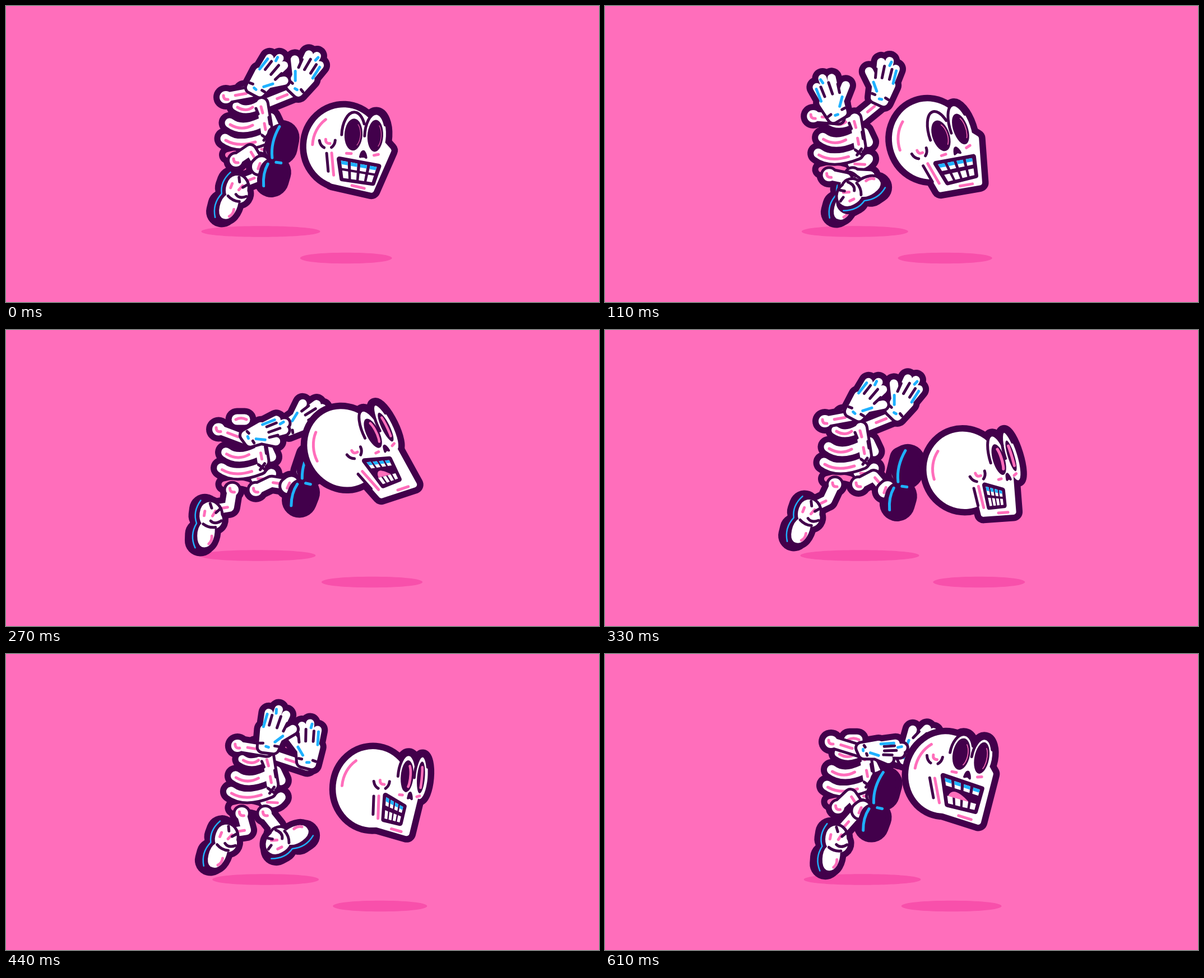
Recreate the animation shown at these times as an HTML page with a canvas. Size 1058 px wide and 529 px high, loop 0.66 s.

```html
<!DOCTYPE html>
<html lang="en">
<head>
<meta charset="utf-8">
<title>Skull dribble</title>
<style>
  html, body { margin: 0; width: 100%; height: 100%; overflow: hidden; background: #ff6ebb; }
  canvas { display: block; width: 100vw; height: 100vh; }
</style>
</head>
<body>
<canvas id="stage" width="1058" height="529"></canvas>
<script>
const ctx = document.getElementById('stage').getContext('2d');
const PINK = '#ff6ebb', SHADE = '#f850ab', DARK = '#42004b', BLUE = '#1fb1ff', WHITE = '#fff';
const HALO = 22, LINE = 10;
const LOOP = 660, BOUNCE = LOOP / 2, CONTACT = 50;
const TICKS = [0, 50, 110, 160, 220, 270, 330, 380, 440, 500, 550, 610];

// Evenly spaced points of one stride: x, y, turn. Both feet follow them, half a loop apart.
const STRIDE = [[479, 282, -176], [430, 374, -80], [359, 346, 2], [352, 335, 24], [410, 347, 8], [488, 272, -167]];

const HAND = {
  solid: 'M-9,-4L-17,-36L13,-38L10,-8Z M-14,-40L-19,-67 M-4,-40L-4,-79 M8,-40L12,-74 M10,-27L32,-53',
  marks: [
    ['M-11,-46L-12,-65M4,-46L4,-68M17,-44L19,-60M-17,-9L-11,-11M11,-13L17,-14', DARK, 5],
    ['M-20,-40L-21,-64M9,-20L19,-35M-4,-7L1,-7M-6,-71L-8,-78', BLUE, 5]]
};
const SHOE = {
  sole: 'M-11,31L-11,19M-6,-14L-5,-25',
  edge: [['M-20,44Q-31,22 -19,0Q-27,-20 -13,-41', BLUE, 2.5]],
  upper: 'M-3,-36C-16,-30 -15,-8 -9,0C-19,10 -18,36 -8,41C8,45 14,24 13,8C25,6 29,-8 23,-16C22,-32 8,-41 -3,-36Z',
  marks: [
    ['M-5,-22L-6,-14M9,-14L14,-23M9,22Q10,31 4,36', PINK, 5],
    ['M-7,1Q3,8 15,6M4,-36L7,-28M21,-26L15,-20M25,-6Q14,2 6,-5', DARK, 5]]
};
const TREAD = {
  side: 'M10,48L13,17',
  cuff: 'M26,-9L30,-14',
  lobes: 'M-3,43L-2,25M3,-20L5,-34',
  marks: [['M4,62Q16,32 9,5M1,-2L-8,-2M15,-7Q22,-25 17,-47', BLUE, 5]]
};

const lerp = (a, b, t) => a + (b - a) * t;
const mod = (a, n) => ((a % n) + n) % n;
const clamp = (v, low, high) => Math.min(high, Math.max(low, v));
// Cosine that peaks at the given time, n times per loop.
const wave = (t, peak, n = 1) => Math.cos((t - peak) / LOOP * n * 2 * Math.PI);
const place = (x, y, turn = 0, sx = 1, sy = 1) => new DOMMatrix().translate(x, y).rotate(turn).scale(sx, sy);
const segment = (x1, y1, x2, y2, from = 0, to = 1) =>
  `M${lerp(x1, x2, from)},${lerp(y1, y2, from)}L${lerp(x1, x2, to)},${lerp(y1, y2, to)}`;

function shape(d, matrix = new DOMMatrix()) {
  const path = new Path2D();
  path.addPath(new Path2D(d), matrix);
  return path;
}

function oval(x, y, rx, ry, from = 0, to = 360) {
  const rad = Math.PI / 180, path = new Path2D();
  path.ellipse(x, y, rx, ry, 0, from * rad, to * rad);
  return path;
}

function stroke(path, color, width) {
  ctx.strokeStyle = color;
  ctx.lineWidth = width;
  ctx.stroke(path);
}

function solid(path, color, width = 0) {
  ctx.fillStyle = color;
  ctx.fill(path);
  if (width) stroke(path, color, width);
}

const line = (d, color, width) => stroke(new Path2D(d), color, width);

// A part merges several [path, width] solids inside one outline.
function part(solids, marks = [], matrix, color = WHITE) {
  return {
    color,
    solids: solids.map(([d, w]) => [shape(d, matrix), w]),
    marks: marks.map(([d, c, w]) => [shape(d, matrix), c, w])
  };
}

function paint(parts) {
  const fill = (p, color, extra) => p.solids.forEach(([path, w]) => solid(path, color, w + extra));
  parts.forEach(p => fill(p, DARK, HALO));
  parts.forEach(p => {
    fill(p, DARK, LINE);
    fill(p, p.color, 0);
    p.marks.forEach(mark => stroke(...mark));
  });
}

const knob = (x, y) => [`M${x},${y}l.5,0`, 22];
const knobMark = (x, y) => [`M${x - 4},${y - 3}q0,8 8,7`, PINK, 5];

function hand({ x, y, turn, side }) {
  const width = side * (1 - .5 * (turn / 90) ** 2);
  return part([[HAND.solid, 15]], HAND.marks, place(x, y, turn, width, .97));
}

function foot(matrix, fromBelow) {
  if (fromBelow) return [
    part([[TREAD.side, 18]], [], matrix),
    part([[TREAD.cuff, 25]], [['M31,-18L29,-8', PINK, 5]], matrix),
    part([[TREAD.lobes, 41]], TREAD.marks, matrix, DARK)];
  return [
    part([[SHOE.sole, 34]], SHOE.edge, matrix, DARK),
    part([[SHOE.upper, 2]], SHOE.marks, matrix)];
}

// The knee bends forward as far as two equal bones require.
function leg(hipX, hipY, t, shift) {
  const step = mod(t - CONTACT, LOOP) / LOOP * STRIDE.length, i = Math.floor(step);
  const next = STRIDE[(i + 1) % STRIDE.length];
  const [x, y, turn] = STRIDE[i].map((v, n) => lerp(v, next[n], step - i));
  const matrix = place(x + shift, y, turn), below = turn < -150;
  const end = matrix.transformPoint(below ? { x: 30, y: -12 } : { x: 8, y: -25 });
  const dx = end.x - hipX, dy = end.y - hipY, reach = Math.hypot(dx, dy), bone = 31;
  const bend = Math.sqrt(Math.max(0, bone ** 2 - (reach / 2) ** 2)) / reach;
  const kneeX = hipX + dx / 2 + dy * bend, kneeY = hipY + dy / 2 - dx * bend;
  const shin = [kneeX, kneeY, end.x, end.y];
  return [
    part([[segment(hipX, hipY, kneeX, kneeY) + segment(...shin), 17], knob(hipX, hipY)],
      [knobMark(hipX, hipY), [segment(...shin, .1, .6), PINK, 5]]),
    ...foot(matrix, below)];
}

function torso(x, y) {
  const at = place(x, y);
  return [
    part([['M-4,57Q20,50 44,60', 10]], [], at, PINK),
    part([['M52,46Q70,52 80,38M72,-9L80,8', 17]], [['M56,47L74,48', PINK, 5]], at),
    part([['M11,-30Q28,-18 52,-32', 14], ['M-1,0Q20,16 54,0M-9,28Q15,46 60,28', 17], ['M56,-34L64,16', 18]], [
      ['M13,-28Q28,-19 40,-28M0,3Q20,15 40,4M-8,31Q14,44 45,34M55,-29L58,-18M61,1L63,12', PINK, 5],
      ['M46,-26L50,-16M69,-10L71,2M57,22L68,30M68,20L60,31', DARK, 5]], at)];
}

function arm(x, y, { x: hx, y: hy }, socket) {
  const bone = [x, y, hx, hy], marks = [[segment(...bone, .35, .75), PINK, 5]];
  return socket
    ? part([[segment(...bone), 16], knob(x, y)], [...marks, knobMark(x, y)])
    : part([[segment(...bone), 16]], marks);
}

function body(t, sway, landing) {
  const x = 400 - 12 * sway, y = 209 + 10 * sway + 27 * landing;
  const shoulderX = x - 8 - 12 * sway, shoulderY = y - 46 + 9 * sway;
  const drop = 150 + 35 * (1 + wave(t, 190, 2));
  const push = -wave(t, CONTACT + BOUNCE * .1, 2);
  const near = { x: 441 - 28 * sway, y: drop + 16 * sway, turn: 40 + 46 * push - 22 * sway, side: 1 };
  const far = { x: 513 - 28 * sway, y: drop - 16 * sway, turn: 30 + 27 * push + 6 * sway, side: -.9 };
  paint([
    arm(x + 68, y - 37, far), hand(far),
    ...torso(x, y),
    part([['M-7,0L7,0', 19]], [['M-9,0Q0,-5 10,0', PINK, 5]], place(shoulderX + 40, shoulderY - 10 - 14 * sway)),
    ...leg(x + 52, y + 67, t + BOUNCE, 48),
    ...leg(x + 10, y + 67, t, 0),
    arm(shoulderX, shoulderY, near, true), hand(near)]);
}

function mouth([ax, ay], [bx, by], [cx, cy], [dx, dy], open) {
  const spot = (u, v) => `${lerp(lerp(ax, bx, u), lerp(dx, cx, u), v)},${lerp(lerp(ay, by, u), lerp(dy, cy, u), v)}`;
  const patch = (u, v, u2, v2) => new Path2D(`M${spot(u, v)}L${spot(u2, v)}L${spot(u2, v2)}L${spot(u, v2)}Z`);
  const row = lerp(.38, .24, open);
  solid(patch(0, 0, 1, 1), DARK, 9);
  if (open > .3) solid(new Path2D(`M${spot(.08, .68)}Q${spot(.25, .25)} ${spot(.7, .68)}Z`), PINK, 1);
  for (let i = 0; i < 4; i++) {
    const u = i / 4 + .04, u2 = u + .17;
    solid(patch(u, .06, u2, .06 + row), WHITE);
    solid(patch(u, .06, u2, .06 + row * .5), BLUE);
    solid(patch(u, .95 - row, u2, .95), WHITE);
  }
}

// The face is laid out around the cranium centre and slides over it.
function head(t, near) {
  const lean = wave(t, 215);
  const yaw = .45 - .47 * wave(t, 30);
  const pitch = -23 + 24 * lean + 36 * near;
  const open = Math.max(0, 1 - 3 * near);
  const x = 611 + 38 * wave(t, 440) + 15 * wave(t, 45, 2), y = 206 + 132 * near;
  const rx = 64 + 6 * near, ry = 71 - 13 * near ** 2;

  ctx.save();
  ctx.translate(x, y);
  ctx.rotate((-7 - 22 * lean) * Math.PI / 180);
  const at = (px, py) => [px, py + pitch];
  const eyes = [[56 + 36 * yaw, 14 - 9 * yaw], [17 + 54 * yaw, 16 - 6 * yaw]];
  const eyeHeight = 28.5, lid = clamp(17 + pitch / 4, 5, 17);
  const hinge = at(-23 + 41 * yaw, 36 + 20 * open);
  const heel = at(-16 + 30 * yaw + 18 * open, 85 + 24 * open);
  const chin = at(54 + 10 * yaw + 25 * open, 97 + 20 * open);
  const cheek = at(81 - 2 * yaw, 25);
  const brow = ([ex, r], ...arc) => oval(ex, pitch, r + 5, eyeHeight + lid, ...arc);
  const face = new Path2D('M' + [at(eyes[1][0], 0), at(eyes[0][0], 0), cheek, chin, heel, hinge].join('L') + 'Z');
  const mass = [[oval(0, 0, rx, ry), 0], [face, 10], ...eyes.map(eye => [brow(eye), 0])];
  mass.forEach(([path, w]) => solid(path, DARK, w + HALO + 1));
  mass.forEach(([path, w]) => solid(path, WHITE, w));

  stroke(oval(0, 0, rx - 11, ry - 11, 180, 232), PINK, 5);
  const edge = [...hinge, ...heel];
  ctx.translate(-6, 0);
  line(segment(...edge, 0, .65), DARK, 5);
  ctx.translate(9, -1);
  line(segment(...edge, 0, .8), PINK, 5);
  ctx.translate(-3, 1);
  line(segment(...heel, ...chin, .5, .82), PINK, 5);

  const rim = 1 + 4.5 * yaw;
  eyes.forEach(eye => {
    const [ex, r] = eye;
    stroke(brow(eye, 178, 330), DARK, 5);
    solid(oval(ex, pitch, r, eyeHeight), DARK);
    stroke(oval(ex, pitch, Math.max(1, r - 3 - rim / 2), eyeHeight - 6, -55, 55), PINK, rim);
  });

  const [nx, ny] = at(36 + 40 * yaw, 35), gap = eyes[0][0] - eyes[1][0];
  line(`M${nx - gap * .76},${ny - 1}l${gap * .22},0M${nx + gap * .5},${ny}l${gap * .2},-2`, PINK, 5);
  solid(shape('M-5,4Q-3,-7 1,-6Q5,-2 6,5L1,2Z', place(nx, ny, 0, gap / 40)), DARK, 4);
  const joint = place(...at(-29 + 56 * yaw, 17));
  stroke(shape('M-14,-3Q-12,6 -5,9M8,8Q14,3 14,-5', joint), DARK, 5);
  stroke(shape('M-3,-6Q-3,2 5,1', joint), PINK, 5);
  mouth(
    at(-6 + 38 * yaw, 45 - 10 * yaw),
    at(65 - 10 * yaw + 8 * open, 54),
    at(56 - 6 * yaw + 14 * open, 85 + 14 * open - 4 * yaw),
    at(1 + 26 * yaw + 14 * open, 80 + 17 * open - 4 * yaw), open);
  ctx.restore();
}

function shadow(x, y, half) {
  const l = x - half, r = x + half;
  solid(new Path2D(`M${l},${y}C${l},${y - 13} ${r},${y - 13} ${r},${y}C${r},${y + 13} ${l},${y + 13} ${l},${y}Z`), SHADE);
}

function draw(t) {
  const sway = wave(t, 165);
  const landing = ((1 + wave(t, 165, 2)) / 2) ** 1.5;
  // 1 when the skull touches the ground, 0 at the top of its bounce
  const near = Math.abs(2 * mod(t - CONTACT, BOUNCE) / BOUNCE - 1) ** 3;
  ctx.fillStyle = PINK;
  ctx.fillRect(0, 0, 1058, 529);
  ctx.lineCap = ctx.lineJoin = 'round';
  shadow(454.5 - 10 * sway, 403, 106 - 17 * landing);
  shadow(637 - 35 * wave(t, 55), 450.5, 91 - 27 * near);
  body(t, sway, landing);
  head(t, near);
}

const start = performance.now();
let shown = -1;
function tick() {
  const time = (performance.now() - start) % LOOP;
  const current = TICKS.findLast(from => from <= time);
  if (current !== shown) draw(shown = current);
  requestAnimationFrame(tick);
}
tick();
</script>
</body>
</html>
```
